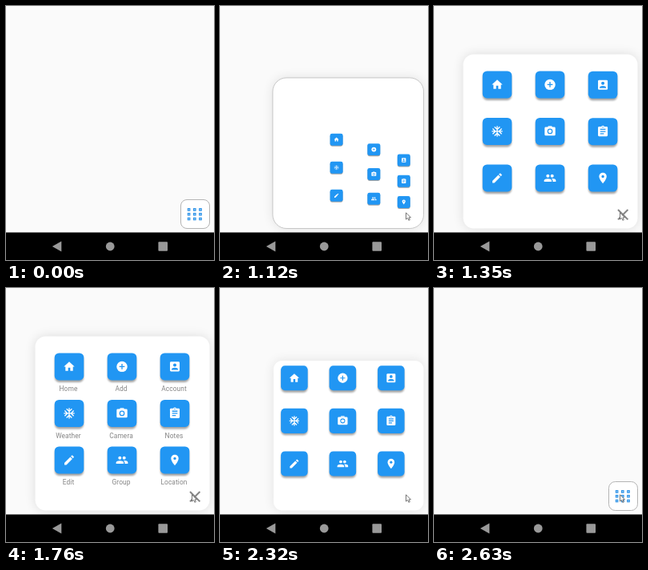
Recreate the animation shown at these times as an HTML page. Size 260 px wide and 318 px high, loop 3060 ms.

```html
<!DOCTYPE html>
<html lang="en">
<head>
<meta charset="utf-8">
<title>Expanding menu</title>
<style>
html, body { margin: 0; width: 100%; height: 100%; overflow: hidden; background: #fafafa; }
svg { display: block; width: 260px; height: 318px; }
text { font: 8.4px Roboto, sans-serif; letter-spacing: .1px; fill: #757575; text-anchor: middle; }
</style>
</head>
<body>
<svg viewBox="0 0 260 318">
  <defs>
    <filter id="soft" filterUnits="userSpaceOnUse" x="0" y="0" width="260" height="318">
      <feGaussianBlur stdDeviation="7"/>
    </filter>
    <filter id="lift" x="-30%" y="-30%" width="160%" height="170%">
      <feGaussianBlur stdDeviation="1.3"/>
    </filter>
  </defs>
  <rect width="260" height="318" fill="#fafafa"/>
  <rect id="shade" filter="url(#soft)"/>
  <rect id="panel" fill="#fff" stroke="#b4b4b4"/>
  <g id="grid" fill="#8dc9f8" stroke="#2a90e6"/>
  <g id="tiles"></g>
  <g id="labels"></g>
  <path id="close" d="M230 255l12.4 12.4m0-12.4l-12.4 12.4" stroke="#858585" stroke-width="2" fill="none"/>
  <rect y="283.5" width="260" height="35"/>
  <g fill="#999">
    <path d="M57.8 301L69.3 294.4V307.6Z"/>
    <circle cx="130.2" cy="301" r="5.4"/>
    <rect x="190.4" y="295.2" width="11.6" height="11.6" rx="1"/>
  </g>
  <path id="cursor" d="M0 0V8.3L2 6.6L3.4 9.5L4.8 8.9L3.5 6.1H6Z" fill="#fff" stroke="#555" stroke-width=".8"/>
</svg>
<script>
const LOOP = 3060;
const BLUE = '#2196f3';
const $ = id => document.getElementById(id);
const clamp = x => Math.min(1, Math.max(0, x));
const mix = (a, b, p) => a + (b - a) * p;
const span = (t, start, length) => clamp((t - start) / length);
const smooth = u => u * u * (3 - 2 * u);
const easeOut = u => 1 - (1 - u) ** 2;

function add(parent, tag, attrs) {
  const el = document.createElementNS('http://www.w3.org/2000/svg', tag);
  set(el, attrs);
  return parent.appendChild(el);
}
function set(el, attrs) {
  for (const key in attrs) el.setAttribute(key, attrs[key]);
}

// Glyphs sit in a 24 unit square; "hole" parts are cut out in the tile colour.
const dot = (x, y, r, fill = '#fff') => `<circle cx="${x}" cy="${y}" r="${r}" fill="${fill}"/>`;
const line = (d, color = BLUE) => `<path d="${d}" stroke="${color}" stroke-width="2" fill="none"/>`;
const shape = d => `<path d="${d}"/>`;
const box = (x, y, w, h) => `<rect x="${x}" y="${y}" width="${w}" height="${h}" rx="2"/>`;
const flakeArm = a => `<g transform="rotate(${a} 12 12)">${line('M12 12V2M7 3.6L12 8.6L17 3.6', '#fff')}</g>`;

const items = [
  ['Home', shape('M10 20V14H14V20H19V12H22L12 3L2 12H5V20Z')],
  ['Add', dot(12, 12, 10) + line('M7 12H17M12 7V17')],
  ['Account', box(3, 3, 18, 18) + dot(12, 9, 3, BLUE) +
    `<path d="M6 18V17C6 13 18 13 18 17V18Z" fill="${BLUE}"/>`],
  ['Weather', [0, 90, 180, 270].map(flakeArm).join('')],
  ['Camera', box(2, 4, 20, 16) + shape('M7 4.2L9 2H15L17 4.2Z') + dot(12, 12, 5, BLUE) + dot(12, 12, 3.2)],
  ['Notes', box(3, 3, 18, 18) + dot(12, 4, 3) + dot(12, 4, 1, BLUE) + line('M7 8H17M7 12H17M7 16H14')],
  ['Edit', shape('M3 17.2V21H6.8L17.8 9.9L14.1 6.2Z') + shape('M15.1 5.1L17.7 2.9L21 6.3L18.9 8.9Z')],
  ['Group', dot(8, 8, 3) + dot(16, 8, 3) + shape('M1 19V16.5C1 12 15 12 15 16.5V19Z') +
    shape('M17 19V16.5Q17 14.4 15 13.1C19 12.7 23 14 23 16.5V19Z')],
  ['Location', shape('M12 2C8.1 2 5 5.1 5 9C5 14.2 12 22 12 22S19 14.2 19 9C19 5.1 15.9 2 12 2Z') + dot(12, 9, 2.5, BLUE)]
];

const tiles = items.map(([name, glyph], i) => {
  const col = i % 3, row = Math.floor(i / 3);
  const el = add($('tiles'), 'g', {});
  add(el, 'rect', { x: -18, y: -14.5, width: 36, height: 34, rx: 5.5, fill: '#000', opacity: .36, filter: 'url(#lift)' });
  add(el, 'rect', { x: -18.3, y: -17, width: 36.6, height: 34, rx: 5.5, fill: BLUE });
  add(el, 'g', { fill: '#fff', transform: 'scale(.67) translate(-12 -12)' }).innerHTML = glyph;
  add($('labels'), 'text', { x: 78 + 66 * col, y: 129.3 + 58.5 * row }).textContent = name;
  return { el, col, x: 79 + 66 * col, y: 98.4 + 58.5 * row };
});

for (let i = 0; i < 9; i++) {
  add($('grid'), 'rect', {
    x: 227.3 + 7.2 * (i % 3), y: 253.6 + 5.8 * Math.floor(i / 3), width: 2.6, height: 2.6
  });
}

function drawPanel(t) {
  const closing = t > 2000;
  const open = closing ? 1 - smooth(span(t, 2225, 370)) : smooth(span(t, 890, 310));
  const settle = span(t, 1120, 230);
  const size = mix(36, 218, open);
  const edge = closing ? clamp(1 - open / .835) : (1 - .35 * open) * (1 - settle);
  const radius = closing ? 8 + 5 * open ** 3 : 7.5 + 11.5 * open - 6 * settle;
  const frame = { x: 254.5 - size, y: 278.5 - size, width: size, height: size, rx: radius };
  set($('panel'), { ...frame, 'stroke-opacity': edge });
  set($('shade'), { ...frame, opacity: .12 * open });
}

function drawTiles(t) {
  const back = 1 - span(t, 2240, 280) ** 2;
  const grow = smooth(span(t, 1020, 220));
  for (const { el, col, x, y } of tiles) {
    const go = t > 2000 ? back : easeOut(span(t, 1000 + 18 * col, 330));
    const scale = t > 2000 ? back : grow;
    set(el, {
      transform: `translate(${mix(245, x, go)} ${mix(270, y, go)}) scale(${scale})`,
      visibility: scale > .01 ? 'visible' : 'hidden'
    });
  }
}

function draw(t) {
  drawPanel(t);
  drawTiles(t);
  const leave = 1 - span(t, 1990, 220);
  set($('labels'), { opacity: easeOut(span(t, 1420, 520)) * leave });
  set($('close'), { opacity: span(t, 1200, 150) * leave });
  set($('grid'), { opacity: t < 2000 ? 1 - span(t, 890, 110) : span(t, 2530, 100) });
  const move = smooth(span(t, 270, 480));
  set($('cursor'), {
    transform: `translate(${mix(227, 232.5, move)} ${mix(318, 258.8, move)})`,
    visibility: t < 290 ? 'hidden' : 'visible'
  });
}

const start = performance.now();
function tick() {
  draw((performance.now() - start) % LOOP);
  requestAnimationFrame(tick);
}
tick();
</script>
</body>
</html>
```
